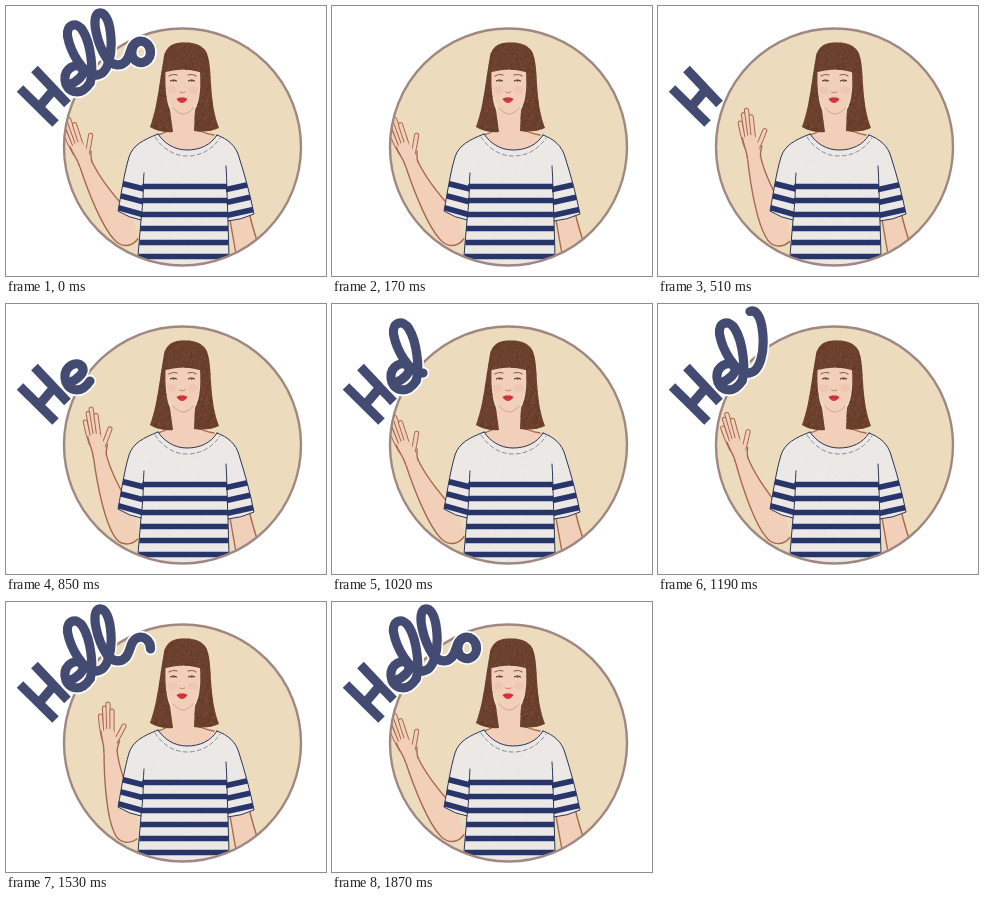
These frames come from a looping animation (320 by 270 pixels, 2.04 s). An HTML page:

```html
<!DOCTYPE html>
<html lang="en">
<head>
<meta charset="utf-8">
<title>Hello</title>
<style>
html, body { margin: 0; width: 100%; height: 100%; overflow: hidden; background: #fff; }
svg { display: block; width: 100%; height: 100%; fill: none; stroke-linecap: round; stroke-linejoin: round; }
.skin { fill: #f1cfb9; }
.edge { stroke: #a9694f; stroke-width: 1.4; }
.hair { fill: #6b402c; }
.shirt { fill: #ebe8e5; }
.seam { stroke: #2b3559; stroke-width: 1; }
.stitch { stroke: #7c7f90; stroke-width: .9; stroke-dasharray: 4 3; }
.stripe { stroke: #27356a; stroke-width: 5.6; stroke-linecap: butt; }
.ink path { stroke: #434b72; stroke-width: 9.2; }
.halo path { stroke: #fff; stroke-width: 12.5; }
.ink .stem, .halo .stem { stroke-linecap: butt; }
</style>
</head>
<body>
<svg viewBox="0 0 320 270" role="img" aria-label="Woman waving: Hello">
  <defs>
    <clipPath id="disc"><circle cx="176.5" cy="141" r="119"/></clipPath>
    <clipPath id="bodyClip"><path id="bodyShape" d="M152 128C158 137 168 144 181 144S205 139 211 129L219 138L221 180L223 262H132L136 190L137 140Z"/></clipPath>
    <clipPath id="leftClip"><path id="leftShape" d="M152 128C137 134 127 139 123 151C118 168 116 184 112 205Q123 212 135 214L139 170V138Z"/></clipPath>
    <clipPath id="rightClip"><path id="rightShape" d="M211 129C222 133 230 140 233 151C239 170 244 188 248 208Q235 214 222 215L219 170V138Z"/></clipPath>
    <clipPath id="hairClip"><path id="hairShape" d="M177 36.5C167 36 160 41 158 50C155 67 153 84 150 99C148 109 146 115 144 121Q153 127 167 126L164 104C160 95 159 80 159.5 66Q177 61 194 66C195 82 194 95 189 104L188 125Q202 127 213 122C208 110 206 94 205 78C204 62 204 52 199 44C194 38 187 36 177 36.5Z"/></clipPath>
  </defs>

  <g clip-path="url(#disc)">
    <rect width="320" height="270" fill="#ecdcbd"/>
    <path class="skin edge" d="M223 208L231 254L254 244C249 229 246 220 243 206Z"/>
    <path class="skin" d="M166 100C167 118 164 125 151 129C158 139 168 146 181 146S205 139 212 129C196 126 188 119 188 100Z"/>
    <path class="edge" d="M165 123Q161 126 152 129M189 122Q196 127 208 129"/>
    <g id="arm"></g>

    <use href="#leftShape" class="shirt"/>
    <use href="#rightShape" class="shirt"/>
    <use href="#bodyShape" class="shirt"/>
    <g id="grain"></g>
    <g id="stripes"></g>
    <path class="seam" d="M152 128C137 134 127 139 123 151C118 168 116 184 112 205Q123 212 135 214M211 129C222 133 230 140 233 151C239 170 244 188 248 208Q235 214 222 215"/>
    <path class="seam" d="M138 167C137 178 138 190 135 214L132 250M220 160C221 175 221 190 222 215L223 250"/>
    <path class="seam" d="M152 128C158 137 168 144 181 144S205 139 211 129"/>
    <path class="stitch" d="M149 131C157 143 168 150 181 150S206 144 214 132"/>

    <path class="skin" d="M159 60C158 77 160 90 165 99C169 105 173 108 177 108S185 105 189 99C194 90 195 76 194 60Z"/>
    <path stroke="#d39a82" stroke-width=".9" d="M167 102C171 106 174 108 177 108S184 106 187 102"/>
    <ellipse cx="166" cy="84" rx="5" ry="4" fill="#eeb6a3" opacity=".35"/>
    <ellipse cx="187" cy="84" rx="5" ry="4" fill="#eeb6a3" opacity=".35"/>
    <use href="#hairShape" class="hair"/>
    <g id="strands" clip-path="url(#hairClip)"></g>
    <path stroke="#8a5a48" stroke-width="1.1" d="M163 70Q167 67.500 171 69M182 69Q187 67.500 190 70"/>
    <path stroke="#4b3029" stroke-width="1.1" d="M164.500 75Q167.500 73 170.500 75M182.500 75Q185.500 73 188.500 75"/>
    <path stroke="#54423d" stroke-width="1.4" d="M167.500 75h.5M185.500 75h.5"/>
    <path stroke="#bd7e66" stroke-width=".9" d="M173.500 86Q176 88 179 86"/>
    <path fill="#d63a3f" d="M170.500 93Q174 90.500 176 91.500Q178 90.500 181.500 93Q179 97 176 97T170.500 93Z"/>
    <path stroke="#a52a31" stroke-width=".6" d="M171.500 93.300Q176 94.300 180.500 93.300"/>
  </g>
  <circle cx="176.5" cy="141" r="118.5" stroke="#a08782" stroke-width="2.4"/>
  <g class="halo" id="halo"></g>
  <g class="ink" id="ink"></g>
</svg>
<script>
const $ = id => document.getElementById(id);
const STEP = 170;

// Pen strokes of the word, in writing order
const strokes = [
  ["stem", "M14 82.500L49.500 117.500"],
  ["stem", "M28.500 63L61.500 98M33 101L47.500 84"],
  ["", "M63 79C72 75 80 68 76 62.500"],
  ["", "M76 62.500C71 56 58 62 59 74C60 86 74 92 84 77"],
  ["", "M84 77C88 66 85 38 77 25C71 15 60 18 61.500 30C64 44 76 69 91 69"],
  ["", "M91 69C102 68 107 48 104.500 27C103 13 98 5 92 7.500"],
  ["", "M92 7.500C85 12 91 38 101 53C107 60 115 61 120 55"],
  ["", "M120 55C125 49 124 39 131 36C138 33 145 39 144.500 47"],
  ["", "M144.500 47C144 57 132 60 127 52C124 45 127 38 132 36"]
];
const written = [9, 0, 1, 2, 3, 4, 5, 6, 7, 8, 9, 9];

// Forearm turn in degrees; the wave repeats every five steps
const wave = [-18, -15, -6, 0, -7.5];
const turnAt = i => i === 0 ? wave[0] : wave[(i - 1) % wave.length];

const lettering = strokes.map(([cls, d]) => `<path class="${cls}" d="${d}"/>`).join("");
$("halo").innerHTML = $("ink").innerHTML = lettering;

const fingers = [
  "M97.500 136Q95 124 94.500 114", "M100 134L98.500 106", "M103 134L102 102",
  "M106 136L106 109", "M108 142Q113 134 118 124"
];
const finger = d =>
  `<path d="${d}" stroke="#a9694f" stroke-width="5.2"/><path d="${d}" stroke="#f1cfb9" stroke-width="3.2"/>`;
$("arm").innerHTML =
  `<path class="skin" d="M98 148C98 180 101 215 108 230C112 241 123 243 132 237V205C122 190 113 168 111 148Z"/>
   <path class="edge" d="M98 148C98 180 101 215 108 230C112 241 123 243 131 237M111 148C113 168 122 190 130 208"/>` +
  fingers.map(finger).join("") +
  `<path class="skin" d="M98 151C98 142 95.500 137 95.500 130Q102 124 108 129L110.500 138C111 142 111 145 111 151Z"/>
   <path class="edge" d="M98 150C98 142 95.500 137 95 129M111 150C111 146 112 143 113.500 139"/>`;

const band = (x1, y1, x2, y2) => `<line class="stripe" x1="${x1}" y1="${y1}" x2="${x2}" y2="${y2}"/>`;
const bands = (clip, n, make) =>
  `<g clip-path="url(#${clip})">${Array.from({ length: n }, (_, i) => make(i)).join("")}</g>`;
$("stripes").innerHTML =
  bands("bodyClip", 6, i => band(130, 180.5 + 14 * i, 225, 180.5 + 14 * i)) +
  bands("leftClip", 3, i => band(110, 176 + 12.5 * i, 140, 183.5 + 13 * i)) +
  bands("rightClip", 3, i => band(218, 184 + 13 * i, 250, 177 + 13 * i));

let seed = 7;
const rand = (a, b) => {
  seed = (seed * 16807) % 2147483647;
  return a + (b - a) * seed / 2147483647;
};
const flecks = (n, x1, y1, x2, y2, colors, len) => Array.from({ length: n }, (_, i) => {
  const x = rand(x1, x2), y = rand(y1, y2);
  return `<path d="M${x.toFixed(1)} ${y.toFixed(1)}l${rand(-1, 1).toFixed(1)} ${len}" stroke="${colors[i % colors.length]}" stroke-width=".8"/>`;
}).join("");
$("strands").innerHTML = flecks(900, 143, 36, 214, 127, ["#80503a", "#5a3422", "#764630"], 1.2);
$("grain").innerHTML = flecks(130, 140, 152, 218, 258, ["#e1deda", "#f3f1ef"], .6);

let shown = -1;
const start = performance.now();
function tick() {
  const i = Math.floor((performance.now() - start) / STEP) % written.length;
  if (i !== shown) {
    shown = i;
    $("arm").setAttribute("transform", `rotate(${turnAt(i)} 118 232)`);
    for (const id of ["halo", "ink"])
      [...$(id).children].forEach((p, k) => p.style.display = k < written[i] ? "" : "none");
  }
  requestAnimationFrame(tick);
}
tick();
</script>
</body>
</html>
```
